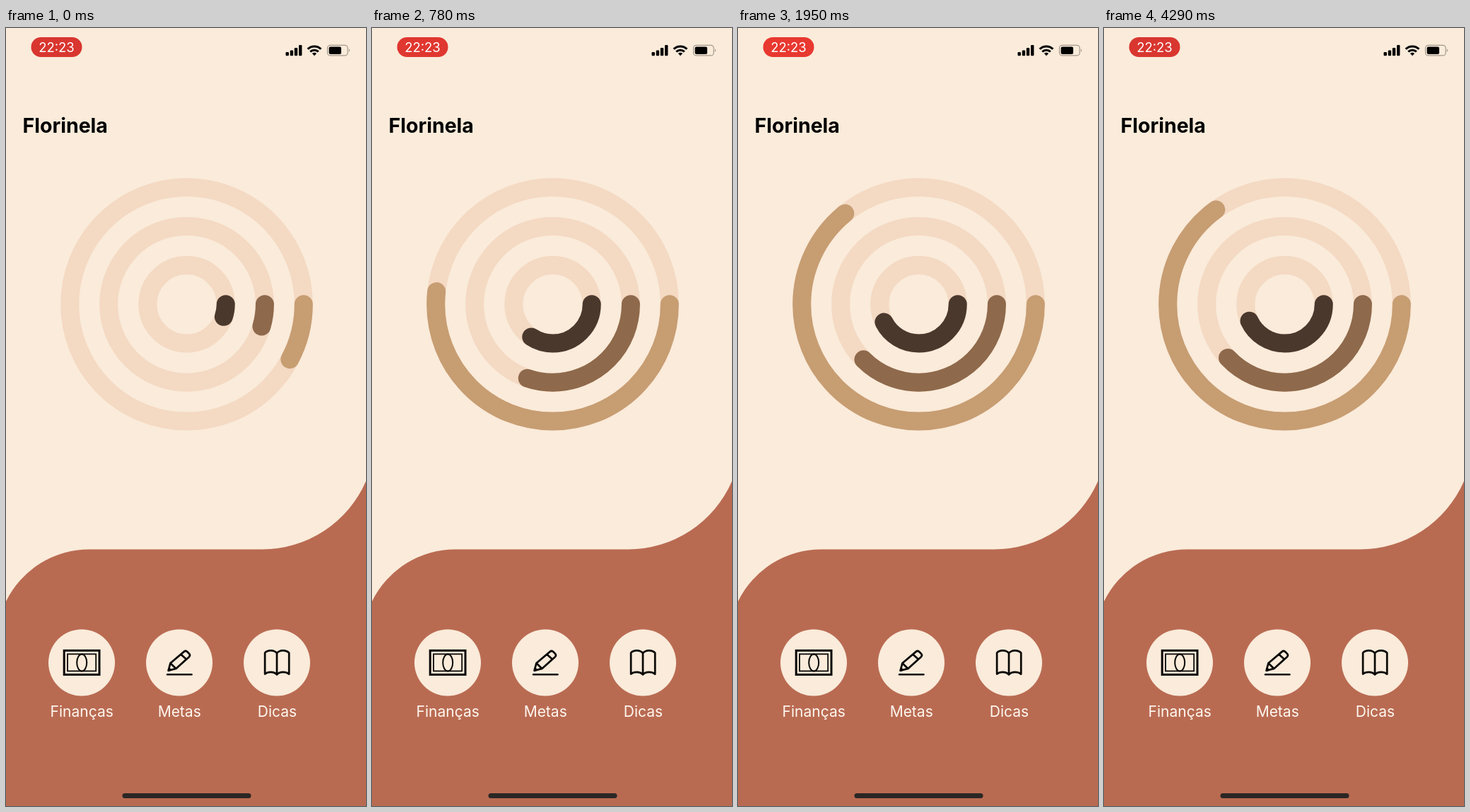
Write an HTML page that moves like this. It is 509 px wide and 1099 px high and loops after 4420 ms.

```html
<!DOCTYPE html>
<html lang="pt">
<head>
<meta charset="utf-8">
<title>Painel</title>
<style>
  html, body { margin: 0; width: 100%; height: 100%; overflow: hidden; background: #faebda; }
  svg { display: block; width: 100%; height: 100%; font-family: Inter, "Liberation Sans", sans-serif; }
  .ring { fill: none; stroke: #f4d9c3; stroke-width: 26; }
  .arc { fill: none; stroke-width: 26; stroke-linecap: round; }
  .icon { fill: none; stroke: #080604; stroke-width: 2.7; stroke-linejoin: round; stroke-linecap: round; }
  .label { fill: #fff8f0; font-size: 21px; text-anchor: middle; }
</style>
</head>
<body>
<svg viewBox="0 0 509 1099">
  <rect width="509" height="1099" fill="#faebda"/>
  <path fill="#b96b52" d="M0 810A131 131 0 0 1 118 736.5H362A160.5 160.5 0 0 0 509 640V1099H0Z"/>

  <rect id="pill" x="35.5" y="13" width="72" height="28" rx="14" fill="#d93630"/>
  <text x="71.5" y="34" font-size="18.5" fill="#fff" text-anchor="middle">22:23</text>

  <g>
    <rect x="395.5" y="34" width="4.4" height="5.2" rx="1.2"/>
    <rect x="401.7" y="31.5" width="4.4" height="7.7" rx="1.2"/>
    <rect x="407.8" y="28" width="4.4" height="11.2" rx="1.2"/>
    <rect x="414" y="24" width="4.4" height="15.2" rx="1.2"/>
  </g>
  <g fill="none" stroke="#000" stroke-width="3">
    <path d="M426.6 29.8A13.4 13.4 0 0 1 445.4 29.8"/>
    <path d="M430.2 33.5A8.4 8.4 0 0 1 441.8 33.5"/>
    <path d="M436 39.2L432.9 36.1A4.4 4.4 0 0 1 439.1 36.1Z" fill="#000" stroke="none"/>
  </g>
  <rect x="454.5" y="24.3" width="28.6" height="14.6" rx="4" fill="none" stroke="#a2988d" stroke-width="1.2"/>
  <path d="M484.8 29.3Q487.6 31.6 484.8 34Z" fill="#a2988d"/>
  <rect x="456.6" y="26.4" width="17.4" height="10.6" rx="2"/>

  <text x="23.5" y="148" font-size="28.5" font-weight="700">Florinela</text>

  <g id="rings"></g>

  <g fill="#faebda">
    <circle cx="107" cy="896.5" r="47"/>
    <circle cx="245" cy="896.5" r="47"/>
    <circle cx="383" cy="896.5" r="47"/>
  </g>
  <g class="icon">
    <rect x="82.2" y="879.4" width="49.8" height="34" stroke-width="3" stroke-linejoin="miter"/>
    <rect x="87" y="884.4" width="40.2" height="24" stroke-width="1.8" stroke-linejoin="miter"/>
    <ellipse cx="107.2" cy="896.4" rx="7" ry="12" stroke-width="2"/>
    <path d="M229.6 907.7L232.4 897.3L251.8 880.9Q254.2 879 256.4 881.2L259 883.9Q261 886.2 258.8 888.4L240.4 904.9ZM232.4 897.3L240.4 904.9M247.3 884.8L255 891.8"/>
    <path d="M229.3 908.2L230.6 903.4L234 906.8Z" fill="#080604" stroke-width="1"/>
    <path d="M228 913.2H262.5" stroke-width="2.4"/>
    <path d="M383 883.2C379 878.3 370 878.3 366.1 882.6V912.6C370.5 908.8 379 909 383 913.4C387 909 395.5 908.8 400.2 912.6V882.6C396 878.3 387 878.3 383 883.2V913"/>
  </g>
  <text class="label" x="107.2" y="973">Finanças</text>
  <text class="label" x="245.2" y="973">Metas</text>
  <text class="label" x="383.4" y="973">Dicas</text>

  <rect x="164.5" y="1081" width="182" height="7" rx="3.5" fill="#2b2725"/>
</svg>
<script>
const LOOP = 4420, STEP = 130;
const RINGS = [
  { r: 165.3, sweep: 234, color: '#c79d72' },
  { r: 110.4, sweep: 136.8, color: '#8e694b' },
  { r: 55.2, sweep: 154.8, color: '#4b382d' }
];
const DARK = [217, 54, 48], BRIGHT = [255, 59, 48];
const pill = document.getElementById('pill');
const group = document.getElementById('rings');

function addCircle(r, attrs) {
  const el = document.createElementNS('http://www.w3.org/2000/svg', 'circle');
  const all = { cx: 255.5, cy: 390.3, r, pathLength: 360, ...attrs };
  for (const key in all) el.setAttribute(key, all[key]);
  return group.appendChild(el);
}

for (const ring of RINGS) {
  addCircle(ring.r, { class: 'ring' });
  ring.arc = addCircle(ring.r, { class: 'arc', stroke: ring.color });
}

// Heavily damped spring, already under way when the loop begins.
const progress = t => 1 - 1.31 * Math.exp(-2.36 * t) + 0.43 * Math.exp(-6 * t);

// Slow pulse that rests at both ends.
const pulse = t =>
  Math.min(1, Math.max(0, 0.5 + 1.1 * Math.cos(2 * Math.PI * (t - 1.4) / 2.08)));

function draw(ms) {
  const t = Math.floor(ms % LOOP / STEP) * STEP / 1000;
  const p = progress(t), k = pulse(t);
  for (const { arc, sweep } of RINGS) {
    arc.setAttribute('stroke-dasharray', `${(sweep * p).toFixed(2)} 720`);
  }
  const rgb = DARK.map((c, i) => Math.round(c + (BRIGHT[i] - c) * k));
  pill.setAttribute('fill', `rgb(${rgb})`);
}

const start = performance.now();
function tick() {
  draw(performance.now() - start);
  requestAnimationFrame(tick);
}
tick();
</script>
</body>
</html>
```
